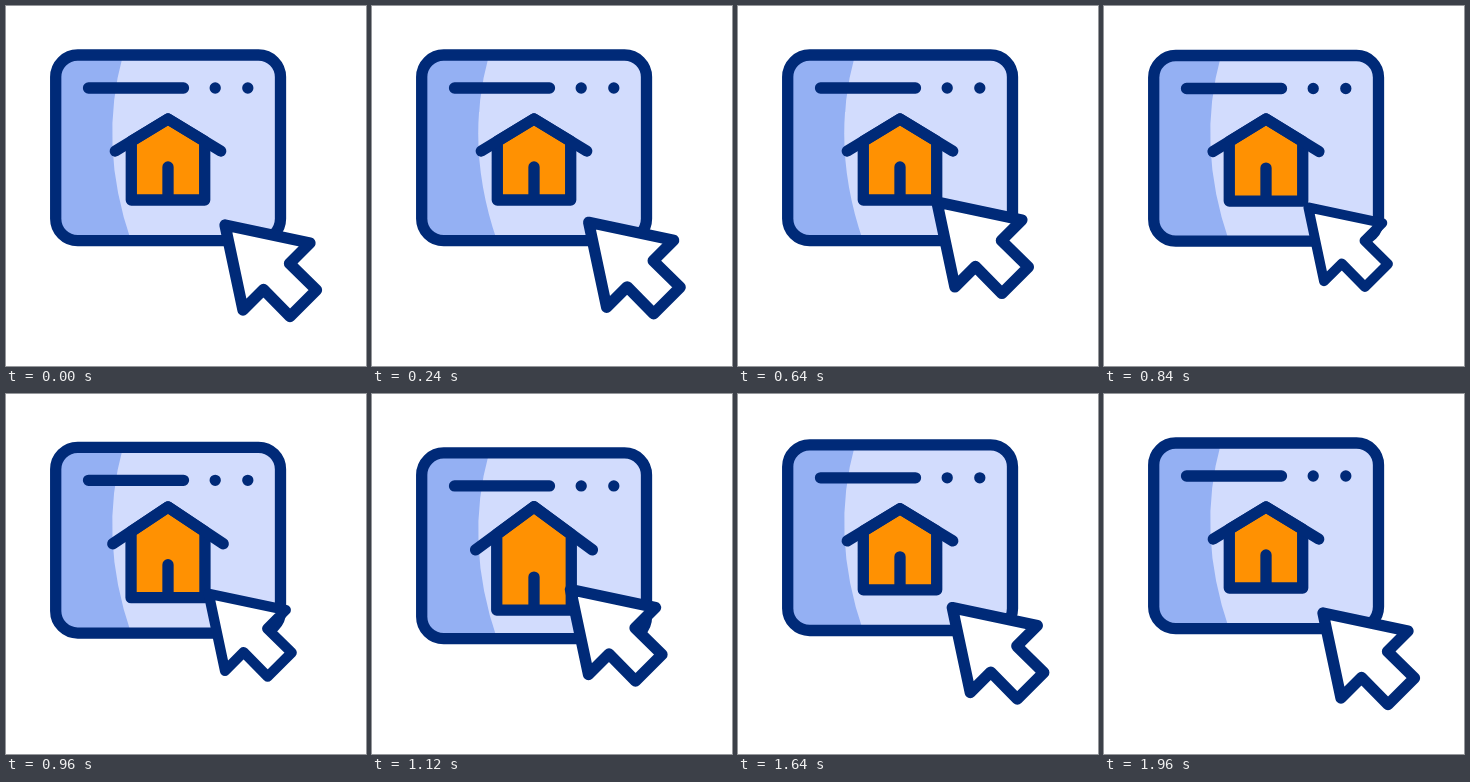
These frames come from a looping animation (360 px wide and 360 px high, 2 s). An HTML page:

```html
<!DOCTYPE html>
<html lang="en">
<head>
<meta charset="utf-8">
<title>Home page click</title>
<style>
  html, body { margin: 0; width: 100%; height: 100%; overflow: hidden; background: #fff; }
  svg { display: block; width: 100vw; height: 100vh; }
  .line { stroke: #002a78; stroke-width: 11.3; stroke-linecap: round; stroke-linejoin: round; }
</style>
</head>
<body>
<svg viewBox="0 0 360 360">
  <g id="page">
    <rect x="49.7" y="49" width="224.8" height="185.7" rx="22" fill="#d2dcfd"/>
    <path d="M117 49Q92 139 125 234.7H71.7a22 22 0 0 1-22-22V71a22 22 0 0 1 22-22Z" fill="#94b0f3"/>
    <g class="line" fill="none">
      <rect x="49.7" y="49" width="224.8" height="185.7" rx="22"/>
      <path d="M82.5 82H177.5M209.2 82h.01M241.8 82h.01"/>
    </g>
  </g>
  <g class="line">
    <path id="walls" fill="#ff9102"/>
    <path id="roof" fill="none"/>
  </g>
  <path id="cursor" class="line" fill="#fff"
    d="M0 0L85 18L64.5 38.5L91.5 65L65 91.5L38.5 64.5L18 85Z"/>
</svg>
<script>
const LOOP = 2000;
const [page, walls, roof, cursor] =
  ["page", "walls", "roof", "cursor"].map(id => document.getElementById(id));

// cubic-bezier(.42, 0, .58, 1), solved for x by bisection
function ease(x) {
  if (x <= 0) return 0;
  if (x >= 1) return 1;
  let lo = 0, hi = 1;
  for (let i = 0; i < 24; i++) {
    const s = (lo + hi) / 2;
    const bx = 1.26 * s * (1 - s) ** 2 + 1.74 * s * s * (1 - s) + s ** 3;
    if (bx < x) lo = s; else hi = s;
  }
  return lo * lo * (3 - 2 * lo);
}

const ramp = (t, from, to) => ease((t - from) / (to - from));
const pulse = (t, a, b, c, d) => ramp(t, a, b) - ramp(t, c, d);

function drawHouse(drop, stretch) {
  const peak = 113 + drop - 10.5 * stretch;
  const eaves = 145 + drop + stretch;
  const half = 52.7 + 6 * stretch;
  const base = 194 + drop + 12.7 * stretch;
  const side = 36.7 + 0.6 * stretch;
  const wallTop = peak + (eaves - peak) * side / half;
  const left = 162 - side, right = 162 + side;
  walls.setAttribute("d",
    `M${left} ${wallTop}V${base}H${right}V${wallTop}L162 ${peak}Z M162 ${base}V${base - 33}`);
  roof.setAttribute("d", `M${162 - half} ${eaves}L162 ${peak}L${162 + half} ${eaves}`);
}

function draw(t) {
  const travel = pulse(t, 100, 700, 1240, 1840);
  const press = pulse(t, 680, 880, 880, 1080);
  const drop = 10.4 * pulse(t, 780, 1180, 1300, 1780);
  const stretch = pulse(t, 780, 1180, 1260, 1660);

  page.setAttribute("transform", `translate(0 ${drop})`);
  drawHouse(drop, stretch);

  const x = 219 - 20.5 * travel, y = 219 - 23.5 * travel;
  const scale = 1 - 0.14 * press;
  cursor.setAttribute("transform",
    `translate(${x + 45} ${y + 45}) scale(${scale}) translate(-45 -45)`);
}

const start = performance.now();
function tick() {
  draw((performance.now() - start) % LOOP);
  requestAnimationFrame(tick);
}
tick();
</script>
</body>
</html>
```
